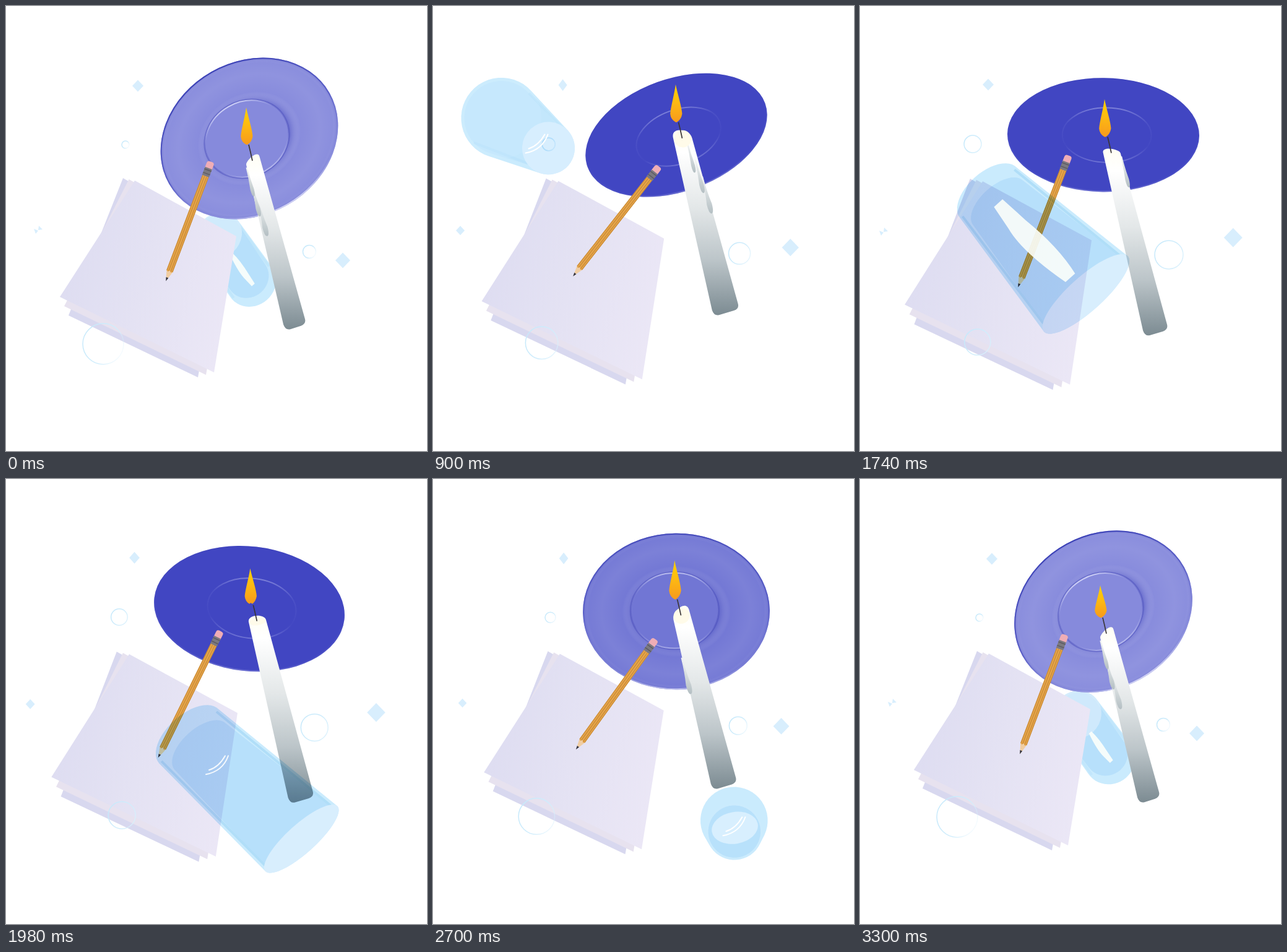
Recreate the animation shown at these times as an HTML page. Size 680 by 719 pixels, loop 3330 ms.

```html
<!DOCTYPE html>
<html lang="en">
<head>
<meta charset="utf-8">
<title>Floating still life</title>
<style>
html, body { margin: 0; width: 100%; height: 100%; overflow: hidden; background: #fff; }
svg { display: block; width: 680px; height: 719px; }
</style>
</head>
<body>
<svg id="stage" viewBox="0 0 680 719" xmlns="http://www.w3.org/2000/svg">
  <defs>
    <linearGradient id="sheetFill" x1="0" y1=".3" x2="1" y2=".6">
      <stop offset="0" stop-color="#dddcf1"/><stop offset=".5" stop-color="#e4e2f3"/><stop offset="1" stop-color="#ebe7f6"/>
    </linearGradient>
    <linearGradient id="waxFill" x1="0" y1="0" x2="0" y2="1">
      <stop offset="0" stop-color="#fffef4"/><stop offset=".12" stop-color="#fff"/><stop offset=".42" stop-color="#e3e7e8"/>
      <stop offset=".7" stop-color="#bcc5c9"/><stop offset="1" stop-color="#7c8b92"/>
    </linearGradient>
    <linearGradient id="flameFill" x1="0" y1="0" x2="0" y2="1">
      <stop offset="0" stop-color="#ffd400"/><stop offset=".5" stop-color="#fdb813"/><stop offset="1" stop-color="#f79a1c"/>
    </linearGradient>
    <linearGradient id="dripFill" x1="0" y1="0" x2="0" y2="1">
      <stop offset="0" stop-color="#f4f6f6"/><stop offset="1" stop-color="#b4bfc3"/>
    </linearGradient>
    <linearGradient id="plateEdge" x1="0" y1="0" x2="0" y2="1">
      <stop offset="0" stop-color="#3c42b6"/><stop offset=".5" stop-color="#4c51c0" stop-opacity=".7"/>
      <stop offset=".85" stop-color="#a5a8ea" stop-opacity=".3"/><stop offset="1" stop-color="#e4e5fb" stop-opacity=".8"/>
    </linearGradient>
    <radialGradient id="plateBand">
      <stop offset=".46" stop-color="#4146b8" stop-opacity=".3"/><stop offset=".58" stop-color="#fff" stop-opacity=".02"/>
      <stop offset=".8" stop-color="#fff" stop-opacity=".08"/><stop offset=".94" stop-color="#fff" stop-opacity=".04"/>
      <stop offset="1" stop-color="#4146b8" stop-opacity=".25"/>
    </radialGradient>
    <linearGradient id="lip" x1="0" y1="0" x2="0" y2="1">
      <stop offset="0" stop-color="#e4e6ff" stop-opacity=".9"/><stop offset=".28" stop-color="#c4c8fa" stop-opacity=".2"/>
      <stop offset=".7" stop-color="#c4c8fa" stop-opacity=".05"/><stop offset="1" stop-color="#dfe1ff" stop-opacity=".7"/>
    </linearGradient>
    <linearGradient id="ringFill" x1="0" y1=".3" x2="1" y2=".8">
      <stop offset="0" stop-color="#c6e9fb"/><stop offset=".55" stop-color="#d0edfc"/><stop id="ringEnd" offset="1" stop-color="#d9f0fc"/>
    </linearGradient>
  </defs>
</svg>
<script>
const NS = 'http://www.w3.org/2000/svg';
const LOOP = 3330, STEP = 30, TAU = Math.PI * 2, RAD = TAU / 360, TILT = -42;
const svg = document.getElementById('stage');

function set(node, attrs) {
  for (const k in attrs) node.setAttribute(k, attrs[k]);
  return node;
}
function add(tag, attrs, parent = svg) {
  return parent.appendChild(set(document.createElementNS(NS, tag), attrs || {}));
}
const lerp = (a, b, k) => a + (b - a) * k;
const clamp = v => Math.max(0, Math.min(1, v));
const mix = (a, b, k) => `rgb(${a.map((v, i) => Math.round(lerp(v, b[i], k)))})`;
const poly = pts => 'M' + pts.map(p => p[0].toFixed(2) + ',' + p[1].toFixed(2)).join('L') + 'Z';

// Sway around a mean: one turn, plus an optional double-speed part
const sway = (th, mean, c1, s1, c2 = 0, s2 = 0) =>
  mean + c1 * Math.cos(th) + s1 * Math.sin(th) + c2 * Math.cos(2 * th) + s2 * Math.sin(2 * th);

// Plate
const plate = add('g');
const dish = add('g', {}, plate);
const disc = add('ellipse', {}, dish);
const band = add('ellipse', { fill: 'url(#plateBand)' }, dish);
const edge = add('ellipse', { fill: 'none', stroke: 'url(#plateEdge)', 'stroke-width': 2 }, dish);
const well = add('g', {}, plate);
const floor = add('ellipse', { stroke: '#4a4fbc', 'stroke-width': 3, 'stroke-opacity': .5 }, well);
const lip = add('ellipse', { fill: 'none', stroke: 'url(#lip)', 'stroke-width': 2 }, well);

function drawPlate(th) {
  const a = sway(th, 152, -3, 0), b = sway(th, 107, 17, -14);
  const tilt = sway(th, -11.5, -14.1, -14, -4);
  const k = Math.pow(clamp(sway(th, .25, .75, -.28)), 1.5);
  const color = mix([65, 70, 194], [134, 138, 220], k);
  set(dish, { transform: `translate(393 ${sway(th, 211, 3, -2)}) rotate(${tilt})` });
  for (const e of [disc, band]) set(e, { rx: a, ry: b });
  set(edge, { rx: a - 1, ry: b - 1, opacity: .3 + .7 * k });
  set(disc, { fill: color });
  set(band, { opacity: Math.min(1, k * 1.4) });
  set(well, { transform: `translate(${sway(th, 394, -5, 2)} ${sway(th, 211.5, 3, 0)}) rotate(${tilt})` });
  set(floor, { rx: a * .47, ry: b * .49, fill: color, opacity: Math.min(1, k * 2) });
  set(lip, { rx: a * .47 - 1, ry: b * .49 - 1, opacity: .4 + .5 * k });
}

// Paper: corners of the top sheet, and how far the lowest one slips out
const CORNERS = [[208, 282], [372, 372], [336, 592], [87, 470]];
const SLIP = [[-19, -4], [-20, 0], [-26, 8], [14, 30]];
const sheets = ['#d8d8ef', '#e7e2ef', 'url(#sheetFill)'].map(fill => add('path', { fill }));

function drawSheets(c) {
  sheets.forEach((node, i) => set(node, {
    d: poly(CORNERS.map(([px, py], j) => {
      const x = px + SLIP[j][0] * (1 - i / 2), y = py + SLIP[j][1] * (1 - i / 2);
      return [x + c * ((x - 360) * .065 + (y - 282) * .015), y + c * (y - 262) * .06];
    }))
  }));
}

// Drifting rings and diamonds: place, size, travel, growth
const drift = (tag, attrs) => o => ({ ...o, node: add(tag, attrs) });
const rings = [
  { x: 157, y: 546, r: 33, dx: 33, dy: -3, grow: -12 },
  { x: 490, y: 397, r: 10.5, dx: 9, dy: 5, grow: 12.5 },
  { x: 193, y: 224, r: 6, dx: -11, dy: -1, grow: 8 }
].map(drift('circle', { fill: 'none', stroke: 'url(#ringFill)', 'stroke-width': 1.5 }));
const gems = [
  { x: 213, y: 129, r: 9, dx: -6, dy: -2, grow: 0, spin: 2 },
  { x: 544, y: 411, r: 12, dx: 59, dy: -37, grow: 3, spin: 0 },
  { x: 52, y: 361, r: 6.5, dx: -14, dy: 3, grow: 1, spin: 0, folds: true }
].map(drift('path', { fill: '#d8eefd' }));
const ringEnd = document.getElementById('ringEnd');

function drawBits(c, s) {
  set(ringEnd, { 'stop-opacity': .1 + .8 * c });
  for (const o of rings) set(o.node, { cx: o.x + o.dx * c, cy: o.y + o.dy * c, r: o.r + o.grow * c });
  for (const o of gems) {
    const x = o.x + o.dx * c, y = o.y + o.dy * c, h = o.r + o.grow * c + .5, w = h - o.spin * s - .5;
    set(o.node, {
      d: o.folds && s < .06
        ? poly([[x - 7, y - 1], [x, y + 2], [x - 4, y + 7]]) + poly([[x + 1, y - 6], [x + 7, y], [x, y + 1]])
        : poly([[x, y - h], [x + w, y], [x, y + h], [x - w, y]])
    });
  }
}

// Pencil
const pencil = add('g');
add('path', { fill: '#efadb6', d: 'M-6,13V4Q-6,0 -2,0H2Q6,0 6,4V13Z' }, pencil);
add('rect', { x: -6, y: 11, width: 12, height: 14, fill: '#7b7980' }, pencil);
add('path', { d: 'M-6,14.5H6M-6,20.5H6', stroke: '#5c5a62', 'stroke-width': 1.5 }, pencil);
const wood = add('path', { fill: '#e5a54b' }, pencil);
const grain = add('path', { stroke: '#c98a35', 'stroke-width': 1.2, fill: 'none' }, pencil);
const cone = add('path', { fill: '#f0cda2' }, pencil);
const lead = add('path', { fill: '#343238' }, pencil);

function drawPencil(c, s) {
  const len = 228 * (1 - .096 * Math.pow(1 - c, 2.5)), end = len - 17;
  const tip = `L-2.5,${end + 2}L0,${end - 1}L2.5,${end + 2}L5.3,${end}`;
  set(pencil, { transform: `translate(${294.7 + 1.5 * c} 348) rotate(${20.7 + 17.6 * s}) translate(0 ${-len / 2})` });
  set(wood, { d: `M5.3,25H-5.3V${end}${tip}Z` });
  set(grain, { d: [-4.8, -1.6, 2, 4.8].map(x => `M${x},25V${end}`).join('') });
  set(cone, { d: `M-5.3,${end}${tip}L1.8,${len - 6}H-1.8Z` });
  set(lead, { d: `M-2,${len - 6}H2L0,${len}Z` });
}

// Candle
const candle = add('g');
const wax = add('path', { fill: 'url(#waxFill)' }, candle);
const drips = [0, 1, 2].map(() => add('path', { fill: 'url(#dripFill)' }, candle));
const cap = add('ellipse', { fill: '#fffbe9' }, candle);
const wick = add('path', { fill: 'none', stroke: '#3a3638', 'stroke-width': 1.7 }, candle);
const flame = add('path', { fill: 'url(#flameFill)' }, candle);

function drawCandle(th, c, s) {
  const top = [398 + 8 * c, 247 - 30 * s - 12 * c], foot = [468 + 11 * c, 520 - 30 * s + 10 * c];
  const dx = foot[0] - top[0], dy = foot[1] - top[1], len = Math.hypot(dx, dy);
  const d = [dx / len, dy / len], n = [d[1], -d[0]];
  const tw = 12 + 1.5 * c + 2 * s, fw = 18 + 2 * c + 2.5 * s;
  const pt = (u, v) => [top[0] + n[0] * u + d[0] * v, top[1] + n[1] * u + d[1] * v];
  const p = (u, v) => pt(u, v).map(z => z.toFixed(2)).join(',');
  const peak = Math.cos(th + 38 * RAD), rise = -6 - 9 * s;
  set(wax, {
    d: `M${p(-tw, 3 + 5 * peak)}C${p(-tw, rise + 9 * peak)} ${p(tw, rise - 9 * peak)} ${p(tw, 3 - 5 * peak)}` +
      `L${p(fw, len - 10)}Q${p(fw, len - 2)} ${p(fw - 9, len - 1)}` +
      `L${p(9 - fw, len)}Q${p(1 - fw, len)} ${p(-fw, len - 10)}Z`
  });
  // Each drip sits higher and further around the stem than the one before
  drips.forEach((node, i) => {
    const a = th - (33 + 22 * i) * RAD, w = 4.2 - .6 * i;
    const y0 = (.24 - .1 * i) * len, y1 = (.45 - .12 * i) * len, mid = lerp(y0, y1, .4), low = lerp(y0, y1, .75);
    const u = Math.sin(a) * lerp(tw, fw, low / len);
    set(node, {
      opacity: Math.cos(a) > -.4 ? 1 : 0,
      d: `M${p(u - 1, y0)}Q${p(u - 1, mid)} ${p(u - w, low)}Q${p(u - w, y1)} ${p(u, y1)}` +
        `Q${p(u + w, y1)} ${p(u + w, low)}Q${p(u + 1, mid)} ${p(u + 1, y0)}Z`
    });
  });
  set(cap, {
    rx: tw * .93, ry: 2 + 12 * s, opacity: clamp(s * 3),
    transform: `translate(${pt(0, 4)}) rotate(${-14 - 18 * peak})`
  });
  const wx = top[0] - 6, wy = top[1] - 23;
  set(wick, { d: `M${wx},${wy}Q${wx + 3},${wy + 12} ${top[0]},${top[1] + 3}` });

  // Four flickers per loop: stretch, then settle with a notched foot
  const ph = th / TAU * 4 % 1;
  const dent = clamp((ph - .28) / .22) * clamp((.95 - ph) / .15);
  const h = ph < .25 ? 60 + 12 * ph : lerp(63, 52, clamp((ph - .25) * 4));
  const x = 389 + 7 * c, y = wy - 4 * dent;
  const f = (u, v) => `${(x + u).toFixed(2)},${(y - v * h).toFixed(2)}`;
  set(flame, {
    d: `M${f(-1, 1)}C${f(2, .75)} ${f(9, .4)} ${f(9.5, .22)}Q${f(8, .07)} ${f(1 + 3 * dent, 0)}` +
      `L${f(0, .07 * dent)}L${f(-1 - 2.5 * dent, 0)}Q${f(-9, .07)} ${f(-9.8, .22)}C${f(-9, .4)} ${f(-3, .75)} ${f(-1, 1)}Z`
  });
}

// Glass: two round ends circling in depth, joined by their outline
const glass = add('g');
const body = add('g', { style: 'mix-blend-mode:multiply' }, glass);
const shell = add('path', { fill: '#caebfd' }, body);
const inside = add('path', { fill: '#b7e0fb' }, body);
const walls = add('path', { fill: 'none', stroke: '#b0def8', 'stroke-width': 4 }, body);
const rimDisc = add('ellipse', { fill: '#d8eefd' }, body);
const baseDisc = add('ellipse', { fill: '#d8effe' }, body);
const water = add('ellipse', { fill: '#d8effe' }, body);
const streak = add('path', { fill: '#fcfffb', 'fill-opacity': .9 }, glass);
const arcs = add('path', { fill: 'none', stroke: '#fff', 'stroke-width': 2, 'stroke-linecap': 'round' }, glass);
const AX = [Math.cos(TILT * RAD), Math.sin(TILT * RAD)];

// Perspective: an end grows and spreads from the middle as it comes near
function project(th, size, depth, nearest, wx, wy, squash) {
  const k = 1 / (1 - depth * Math.cos(th - nearest * RAD));
  return { x: 318 + wx * k, y: 390 + wy * k, a: size * k, b: size * k * squash };
}
function between(p, q, k, scale = 1) {
  const o = {};
  for (const key in p) o[key] = lerp(p[key], q[key], k);
  return { ...o, a: o.a * scale, b: o.b * scale };
}
function oval({ x, y, a, b }, scale = 1) {
  return Array.from({ length: 48 }, (_, i) => {
    const u = a * scale * Math.cos(i / 48 * TAU), v = b * scale * Math.sin(i / 48 * TAU);
    return [x + u * AX[0] - v * AX[1], y + u * AX[1] + v * AX[0]];
  });
}
function hull(pts) {
  pts.sort((p, q) => p[0] - q[0] || p[1] - q[1]);
  const half = list => {
    const out = [];
    for (const p of list) {
      while (out.length > 1) {
        const [a, b] = out.slice(-2);
        if ((b[0] - a[0]) * (p[1] - a[1]) - (b[1] - a[1]) * (p[0] - a[0]) > 0) break;
        out.pop();
      }
      out.push(p);
    }
    return out.slice(0, -1);
  };
  return half(pts).concat(half(pts.slice().reverse()));
}
function place(node, o, opacity, turn = TILT) {
  set(node, { rx: o.a, ry: o.b, opacity: clamp(opacity), transform: `translate(${o.x} ${o.y}) rotate(${turn})` });
}

function drawGlass(th) {
  const facing = Math.cos(th - 120 * RAD);
  const squash = Math.min(1, Math.abs(1.35 * facing - .2));
  const rim = project(th, 56.3, .407, 168, sway(th, 18, 17, -197), sway(th, 12, -22, -215, -16, -8), squash);
  const base = project(th, 49, .25, 225, sway(th, -8, 100, -132), sway(th, -16, 82, -155, 0, 18), lerp(squash, 1, .35));
  const front = clamp(3 * facing - 1.8), back = clamp(-4 * facing - 2.6);
  const shine = Math.cos(2 * th), near = Math.cos(th) < -.05;

  set(shell, { d: poly(hull([...oval(rim), ...oval(base)])) });
  set(inside, {
    opacity: 1 - .6 * front,
    d: poly(hull([...oval(between(base, rim, .1 + .8 * back), .84), ...oval(rim, .92)]))
  });
  const q = (u, k) => {
    const o = between(base, rim, u);
    return `${o.x + o.a * k * AX[0]},${o.y + o.a * k * AX[1]}`;
  };
  set(walls, {
    d: [-.92, .92].map(k => `M${q(0, k)}L${q(1, k)}`).join(''),
    opacity: clamp((Math.hypot(rim.x - base.x, rim.y - base.y) - 60) / 80)
  });
  place(rimDisc, rim, 1.6 * (1 - Math.abs(facing)));
  place(baseDisc, base, front);
  const pool = between(base, rim, .5);
  place(water, { x: pool.x + 1, y: pool.y + 3, a: rim.a * .82, b: rim.b * .56 }, back, -10);

  const [u0, u1, w] = near ? [.1, .84, .24] : [-.06, .6, .13];
  set(streak, {
    opacity: clamp(4 * shine - 2.5),
    d: `M${q(u0, -w * .6)}L${q(u0, w * .6)}L${q(lerp(u0, u1, .3), w * .75)}` +
      `Q${q(lerp(u0, u1, .7), w * 1.1)} ${q(u1, w * .5)}L${q(u1, -w * .5)}` +
      `Q${q(lerp(u0, u1, .5), -w * 1.5)} ${q(lerp(u0, u1, .25), -w)}Z`
  });
  const glint = between(base, rim, .25);
  set(arcs, {
    opacity: 1 - clamp(3 * shine - 1),
    transform: `translate(${glint.x} ${glint.y + 6})`,
    d: 'M18,-16Q9,9 -18,14M13,-16Q3,2 -13,7'
  });
  const before = near ? null : plate;
  if (glass.nextSibling !== before) svg.insertBefore(glass, before);
}

function draw(t) {
  const th = t / LOOP * TAU;
  const c = (1 - Math.cos(th)) / 2, s = (1 - Math.cos(2 * th)) / 2;
  drawPlate(th);
  drawSheets(c);
  drawBits(c, s);
  drawPencil(c, s);
  drawCandle(th, c, s);
  drawGlass(th);
}

const start = performance.now();
function tick() {
  const t = (performance.now() - start) % LOOP;
  draw(Math.floor(t / STEP) * STEP);
  requestAnimationFrame(tick);
}
draw(0);
requestAnimationFrame(tick);
</script>
</body>
</html>
```
